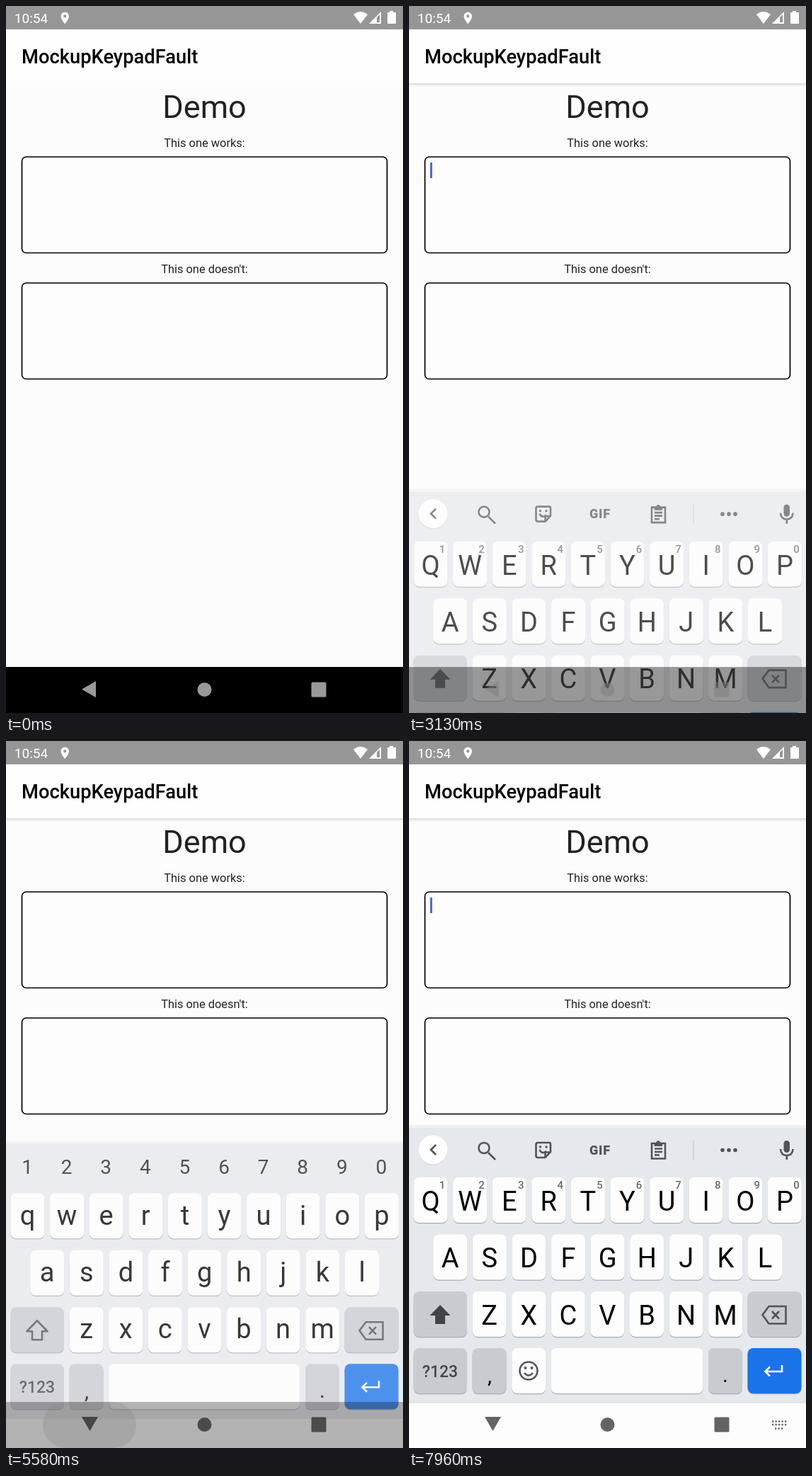
An HTML page that plays this animation: 561 by 998 pixels, repeating every 8000 ms.

```html
<!DOCTYPE html>
<html lang="en">
<head>
<meta charset="utf-8">
<title>Keyboard demo</title>
<style>
  html, body { margin: 0; width: 100%; height: 100%; overflow: hidden; background: #fcfcfd; }
  svg { display: block; width: 100vw; height: 100vh; }
  text { font-family: Roboto, sans-serif; text-anchor: middle; }
  .field { fill: #fdfdfe; stroke: #000; stroke-width: 1.7; }
  .line { fill: none; stroke: #50545a; stroke-width: 2.6; }
  .glyph { fill: #50545a; }
  .letter { font-size: 38px; }
  .hint { font-size: 15px; font-weight: 500; fill: #666a70; }
</style>
</head>
<body>
<svg viewBox="0 0 561 998">
  <defs>
    <linearGradient id="fade" x2="0" y2="1">
      <stop stop-color="#000" stop-opacity=".13"/>
      <stop offset="1" stop-color="#000" stop-opacity="0"/>
    </linearGradient>
  </defs>

  <rect width="561" height="998" fill="#fcfcfd"/>
  <rect y="33" width="561" height="76" fill="#fefefe"/>
  <rect id="headerShadow" y="109" width="561" height="5" fill="url(#fade)"/>
  <text x="22" y="81" style="text-anchor:start" font-size="27.3" font-weight="500">MockupKeypadFault</text>
  <text x="280.5" y="158" font-size="45" fill="#222">Demo</text>
  <g font-size="16.4" fill="#222">
    <text x="280.5" y="199">This one works:</text>
    <text x="280.5" y="376.5">This one doesn't:</text>
  </g>
  <rect class="field" x="22.5" y="213" width="516" height="135.5" rx="6"/>
  <rect class="field" x="22.5" y="391" width="516" height="135.5" rx="6"/>
  <rect id="cursor" x="30" width="2.7" height="22" fill="#3c5ce0"/>

  <rect width="561" height="33" fill="#969696"/>
  <g fill="#fff">
    <text x="35.5" y="24" font-size="19.1">10:54</text>
    <path transform="translate(73.4 7) scale(.82)" fill-rule="evenodd" d="M12 2C8.1 2 5 5.1 5 9c0 5.3 7 13 7 13s7-7.700 7-13c0-3.900-3.100-7-7-7zm0 9.500a2.500 2.500 0 010-5 2.500 2.500 0 010 5z"/>
    <path d="M491 12Q501 4 511 12L501 25Z"/>
    <path fill-rule="evenodd" d="M513 25L530 8V25ZM524 16V23H528V12Z"/>
    <path d="M542 9V7h5v2h3q1 0 1 1v14q0 1-1 1h-10q-1 0-1-1V10q0-1 1-1z"/>
  </g>

  <g id="keyboard"></g>

  <rect id="navShade" y="933" width="561" height="65"/>
  <rect id="ripple" x="52" y="933" width="132" height="65" rx="32.5" fill="#808080"/>
  <g id="navIcons">
    <path id="back" d="M-10.500 0L9.500-11.500V11.500Z" stroke-linejoin="round"/>
    <circle cx="280.500" cy="965" r="10"/>
    <rect x="431.500" y="954.500" width="21" height="21" rx="1.500"/>
    <path id="switcher" fill="none" stroke-width="2.300" d="M513 960.500H534M513 965H534M517 970.500H530" stroke-dasharray="2.300 2.200"/>
  </g>
</svg>

<script>
const LOOP = 8000, KEYBOARD_HEIGHT = 452, PITCH = 55.6;
const OPENINGS = [3000, 7540], CLOSING = 5530, REFOCUS = 4710;
const $ = id => document.getElementById(id);

const label = (x, y, s, attrs = '') => `<text x="${x}" y="${y}" ${attrs}>${s}</text>`;
const key = (x, y, width, fill = '#fdfdfd') =>
  `<rect x="${x}" y="${y + 1.3}" width="${width}" height="64" rx="8" fill="#a9adb4"/>` +
  `<rect x="${x}" y="${y}" width="${width}" height="64" rx="8" fill="${fill}"/>`;
const line = (d, attrs = '') => `<path class="line" d="${d}" ${attrs}/>`;

function keyRow(letters, x, y, baseline, hints = false) {
  return [...letters].map((c, i) => {
    const left = x + i * PITCH;
    return key(left, y, 48) + label(left + 24, baseline, c, 'class="letter"') +
      (hints ? label(left + 40.5, 632, (i + 1) % 10, 'class="hint"') : '');
  }).join('');
}

const letterRows = (rows, drop, hints) =>
  keyRow(rows[0], 6.5, 616, 663 - drop, hints) +
  keyRow(rows[1], 34.2, 696.500, 743 - drop) +
  keyRow(rows[2], 89.600, 777, 823.500 - drop);

const shift = 'M44 796L58.500 811H51V823H37V811H29.500Z';

function commonKeys() {
  const gray = '#c9cbd0';
  return `<rect y="542" width="561" height="5" fill="#e9ebf0" opacity=".6"/>
    <rect y="546" width="561" height="387" fill="#e5e8ed"/>
    <rect y="933" width="561" height="65" fill="#fdfdfd"/>
    <rect y="933" width="561" height="1.500" fill="#dcdde0"/>` +
    key(6.500, 777, 75.500, gray) + key(478.500, 777, 76, gray) +
    key(6.500, 857, 75.500, gray) + key(89.600, 857, 48, gray) +
    key(423, 857, 48, gray) + key(478.500, 857, 76, '#1a73e8') +
    line('M499.500 810L508.500 798H532.500V822.500H508.500ZM513 805L523 815.500M523 805L513 815.500') +
    line('M527 881V890H504M510 883.500L503.500 890L510 896.500', 'style="stroke:#fff"') +
    label(44, 897.500, '?123', 'font-size="23" font-weight="500" fill="#44474c"') +
    label(114, 906, ',', 'font-size="30"') + label(447, 905, '.', 'font-size="30"');
}

function toolbar() {
  return `<circle cx="34" cy="578" r="20.500" fill="#d0d3d9"/><circle cx="34" cy="577" r="20.500" fill="#fefefe"/>` +
    line('M38 570L31 577L38 584') +
    line('M122 591L112 581') + `<circle class="line" cx="106" cy="574.500" r="7.500"/>` +
    line('M182 567H198Q200 567 200 569V580L192.500 588H182Q179.500 588 179.500 585.500V569.500Q179.500 567 182 567ZM192.500 587V580.500H200M184.500 577Q188 584 194 579') +
    `<g class="glyph"><circle cx="185.500" cy="573" r="1.700"/><circle cx="194" cy="573" r="1.700"/>
      <circle cx="443" cy="577.500" r="2.800"/><circle cx="452" cy="577.500" r="2.800"/><circle cx="461" cy="577.500" r="2.800"/></g>` +
    label(270, 583.500, 'GIF', 'class="glyph" font-size="18" font-weight="900" letter-spacing=".8"') +
    line('M343 568H362V589.500H343ZM347 575.500H358M347 580H358M347 584.500H354') +
    `<path class="glyph" d="M346.500 567H349Q352 561 355.500 567H358V572H346.500Z"/>` +
    `<path d="M402 563V592" stroke="#cdd1d8" stroke-width="1.500"/>` +
    `<rect class="glyph" x="529.500" y="564" width="8.500" height="17" rx="4.250"/>` +
    line('M525 576Q525.500 585 533.800 585T542.500 576M533.800 585V591');
}

function capitalLayout() {
  return `<g id="capitals">` + toolbar() +
    letterRows(['QWERTYUIOP', 'ASDFGHJKL', 'ZXCVBNM'], 0, true) +
    `<path d="${shift}" fill="#414347"/>` +
    key(145.200, 857, 48) + key(200.500, 857, 215) +
    `<circle class="line" cx="169" cy="889" r="12.500"/>` + line('M163 892Q169 899 175 892') +
    `<circle class="glyph" cx="164.500" cy="885" r="2"/><circle class="glyph" cx="173.500" cy="885" r="2"/></g>`;
}

function smallLayout() {
  const digits = [...'1234567890'].map((n, i) => label(30 + i * PITCH, 589, n, 'font-size="28" fill="#222"'));
  return `<g id="smalls">` + digits.join('') +
    letterRows(['qwertyuiop', 'asdfghjkl', 'zxcvbnm'], 2.500) +
    line(shift, 'stroke-linejoin="round"') + key(145.200, 857, 270) + `</g>`;
}

$('keyboard').innerHTML = commonKeys() + capitalLayout() + smallLayout();

const ramp = (t, from, length) => Math.min(1, Math.max(0, (t - from) / length));
const mix = (a, b, k) => a + (b - a) * k;

function keyboardPose(t, opened) {
  if (t >= CLOSING && t < OPENINGS[1]) {
    const v = ramp(t, CLOSING, 230);
    const turn = 1 - ramp(t, 5600, 150);
    return { shown: 1 - v, drop: KEYBOARD_HEIGHT * v * v, tint: turn, turn };
  }
  const shown = 1 - (1 - ramp(t, opened + 50, 250)) ** 3;
  return {
    shown, drop: KEYBOARD_HEIGHT * (1 - shown),
    tint: ramp(t, opened, 260), turn: ramp(t, opened + 130, 200)
  };
}

function render(t) {
  const opened = t < OPENINGS[1] ? OPENINGS[0] : OPENINGS[1];
  const { shown, drop, tint, turn } = keyboardPose(t, opened);
  const second = t >= REFOCUS && t < OPENINGS[1];
  const focused = t >= opened && !(t >= CLOSING && t < OPENINGS[1]);
  const blinkOn = Math.floor((t - (second ? REFOCUS : opened)) / 500) % 2 === 0;

  $('headerShadow').setAttribute('opacity', t < 40 ? 0 : 1);
  $('cursor').setAttribute('y', second ? 399 : 221);
  $('cursor').setAttribute('opacity', focused && blinkOn ? 1 : 0);

  $('keyboard').setAttribute('opacity', shown);
  $('keyboard').setAttribute('transform', `translate(0 ${drop})`);
  const small = t >= REFOCUS + 80 && t < OPENINGS[1];
  $('capitals').style.display = small ? 'none' : '';
  $('smalls').style.display = small ? '' : 'none';

  // The navigation buttons stay dimmed until the back button is touched.
  const bright = mix(mix(.6, .75, tint), 1, ramp(t, 5480, 120));
  const shade = Math.round(255 * (1 - tint));
  const color = `rgb(${shade},${shade},${shade})`;
  $('navShade').setAttribute('opacity', Math.min(1, 1.3 * (1 - shown)));
  $('navIcons').setAttribute('opacity', mix(1, .6, tint) * bright);
  $('navIcons').setAttribute('fill', color);
  $('back').setAttribute('transform', `translate(${117.5 + turn} ${964.5 - turn}) rotate(${-90 * turn})`);
  $('switcher').setAttribute('stroke', color);
  $('switcher').setAttribute('opacity', focused ? ramp(t, opened + 200, 120) : 0);
  $('ripple').setAttribute('opacity', .25 * ramp(t, 5490, 60) * (1 - ramp(t, 5660, 300)));
}

function tick(now) {
  render(now % LOOP);
  requestAnimationFrame(tick);
}
requestAnimationFrame(tick);
</script>
</body>
</html>
```
